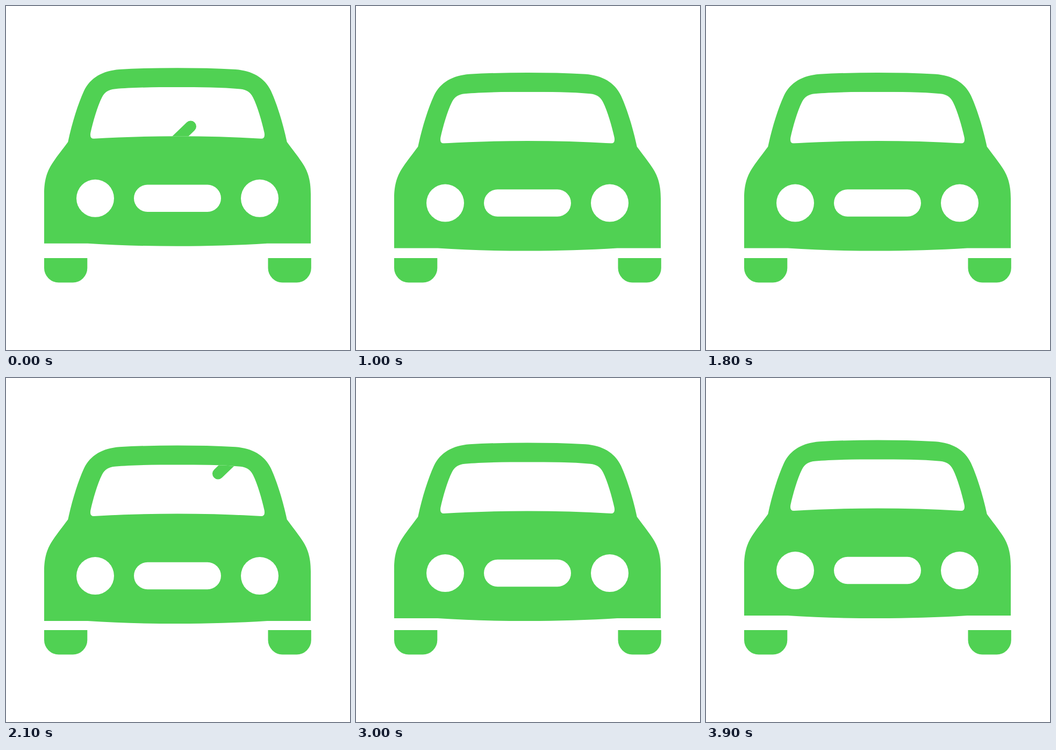
An HTML page for the animation above (4000 ms loop, 640 px wide and 640 px high).

```html
<!DOCTYPE html>
<html lang="en">
<head>
<meta charset="utf-8">
<title>Car</title>
<style>
  html, body { margin: 0; width: 100%; height: 100%; overflow: hidden; background: #fff; }
  svg { display: block; width: 100vw; height: 100vh; }
</style>
</head>
<body>
<svg viewBox="0 0 640 640" fill="#50d153">
  <defs>
    <clipPath id="glass">
      <path d="M319 151C280 151 235 151.3 202 154.5C191 155.8 184 159.5 178.500 170C170 187 162 215 157.300 236Q155.500 247 163.500 246.800C215 243.600 267 242.200 319 242.200C371 242.200 423 243.600 474.500 246.800Q482.500 247 480.700 236C476 215 468 187 459.500 170C454 159.500 447 155.800 436 154.500C403 151.300 358 151 319 151Z"/>
    </clipPath>
  </defs>
  <path d="M71 469H151.300V487.500A27 27 0 0 1 124.300 514.500H98A27 27 0 0 1 71 487.500Z"/>
  <path d="M487.500 469H567.800V487.500A27 27 0 0 1 540.800 514.500H514.500A27 27 0 0 1 487.500 487.500Z"/>
  <g id="car">
    <path d="M71 441.800V350C71 322 77 306 88 290C96 278 105 267 115.300 253C123 217 134 182 145 158C157 133 180 120.500 211 118C246 115.900 283 115.200 319 115.200C355 115.200 392 115.900 427 118C458 120.500 481 133 493 158C504 182 515 217 522.700 253C533 267 542 278 550 290C561 306 567 322 567 350V441.800H486C433 445.300 376 446.800 319 446.800C262 446.800 205 445.300 152 441.800Z"/>
    <g fill="#fff">
      <rect x="150" y="145" width="338" height="108" clip-path="url(#glass)"/>
      <circle cx="166" cy="357.800" r="35"/>
      <circle cx="472" cy="357.800" r="35"/>
      <rect x="238" y="332.500" width="162" height="50.400" rx="25.200"/>
    </g>
    <g clip-path="url(#glass)">
      <g id="glints" stroke="#50d153" stroke-width="21" stroke-linecap="round"></g>
    </g>
  </g>
</svg>
<script>
  const STEP = 100, LOOP = 4000, SWEEP = 2000;
  const bounce = [0, 3.6, 8.8, 13.5, 13.8, 10.3, 5.3, 0.3];
  const dir = { x: 0.72, y: -0.694 };
  const speed = { x: 1.453, y: -1.369 };
  const len = 131;

  // Upper tip of each glint and the moment it gets there
  const glints = [
    { x: 343.5, y: 224, at: 0 },
    { x: 260.5 + len * dir.x, y: 167.5 + len * dir.y, at: 400 },
    { x: 226.5, y: 201.5, at: 400 },
    { x: 361, y: 180.5, at: 400 }
  ];

  const car = document.getElementById('car');
  const layer = document.getElementById('glints');
  for (const g of glints) {
    g.el = document.createElementNS('http://www.w3.org/2000/svg', 'line');
    g.el.setAttribute('x1', g.x);
    g.el.setAttribute('y1', g.y);
    g.el.setAttribute('x2', g.x - len * dir.x);
    g.el.setAttribute('y2', g.y - len * dir.y);
    layer.append(g.el);
  }

  const move = (el, x, y) => el.setAttribute('transform', `translate(${x} ${y})`);

  function draw(ms) {
    const step = Math.floor((ms % LOOP + 2) / STEP);
    const dy = bounce[step % bounce.length];
    const t = step * STEP % SWEEP;
    move(car, 0, dy);
    move(layer, 0, -dy);
    for (const g of glints) move(g.el, speed.x * (t - g.at), speed.y * (t - g.at));
  }

  const start = performance.now();
  function tick() {
    draw(performance.now() - start);
    requestAnimationFrame(tick);
  }
  draw(0);
  requestAnimationFrame(tick);
</script>
</body>
</html>
```
